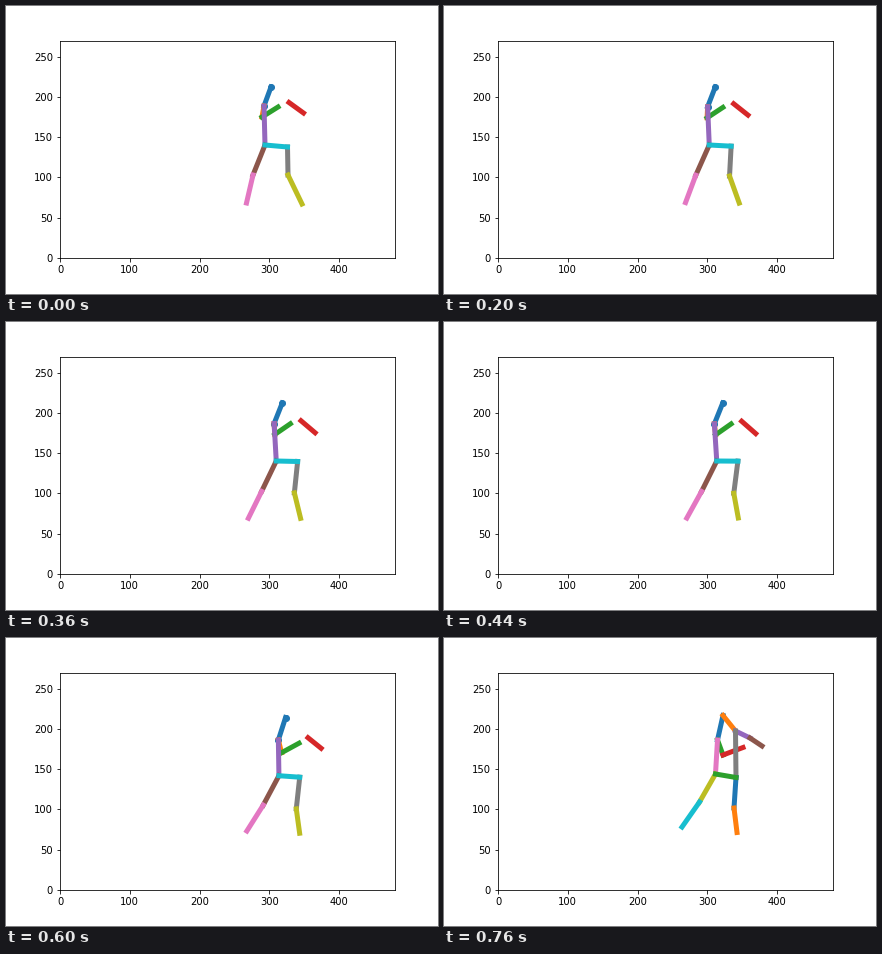
A matplotlib script for the animation above (800 ms loop, 432 by 288 pixels).

```python
import numpy as np
import matplotlib.pyplot as plt
from matplotlib.animation import FuncAnimation

FRAMES, INTERVAL = 20, 40
W, H = 432, 288
X_MAX, Y_MAX = 480, 270
LEFT, RIGHT, BOTTOM, TOP = 0.125, 0.9, 0.125, 0.88
REACH = 12  # frame at which the body stops moving forward

# Key points in stage pixels: start, (furthest reach,) end.
PATHS = {
    "nose": [(265, 81), (280, 81), (279, 77.5)],
    "l_shoulder": [(258, 100), (271.5, 102), (273.5, 102)],
    "l_elbow": [(256, 111), (273, 113), (279, 117)],
    "l_wrist": [(272, 101), (288.5, 102), (299, 109.5)],
    "r_shoulder": [(291.5, 93)],
    "r_elbow": [(283, 96.5), (299, 99.5), (306, 100)],
    "r_wrist": [(297.5, 107), (313, 112), (318, 108)],
    "l_hip": [(259, 139), (274, 139), (271.5, 136)],
    "r_hip": [(281.5, 141), (295, 139), (292, 139.5)],
    "l_knee": [(247, 169), (258.5, 169.5), (255.5, 164)],
    "l_ankle": [(240.5, 197), (243, 196), (238, 189)],
    "r_knee": [(282, 169), (290.5, 171.5), (290, 170)],
    "r_ankle": [(296, 198), (293, 194.5)],
}

BONES = [
    ("nose", "l_shoulder"), ("nose", "r_shoulder"),
    ("l_shoulder", "l_elbow"), ("l_elbow", "l_wrist"),
    ("r_shoulder", "r_elbow"), ("r_elbow", "r_wrist"),
    ("l_shoulder", "l_hip"), ("r_shoulder", "r_hip"),
    ("l_hip", "l_knee"), ("l_knee", "l_ankle"),
    ("r_hip", "r_knee"), ("r_knee", "r_ankle"),
    ("l_hip", "r_hip"),
]


def joint(name, i):
    """Joint position in data units."""
    points = PATHS[name]
    times = [0, REACH, FRAMES - 1] if len(points) == 3 else [0, FRAMES - 1][:len(points)]
    px, py = (np.interp(i, times, values) for values in zip(*points))
    x = (px / W - LEFT) / (RIGHT - LEFT) * X_MAX
    y = (1 - py / H - BOTTOM) / (TOP - BOTTOM) * Y_MAX
    return x, y


fig, ax = plt.subplots(figsize=(W / 72, H / 72), dpi=72, facecolor="white")
fig.subplots_adjust(left=LEFT, right=RIGHT, bottom=BOTTOM, top=TOP)
ax.set(xlim=(0, X_MAX), ylim=(0, Y_MAX),
       xticks=range(0, 401, 100), yticks=range(0, 251, 50))
lines = [ax.plot([], [], lw=5)[0] for _ in BONES]


def draw(i):
    # The right shoulder is only detected at the very end of the loop.
    full = i == FRAMES - 1
    color = 0
    for line, bone in zip(lines, BONES):
        shown = full or "r_shoulder" not in bone
        line.set_visible(shown)
        if shown:
            line.set_data(*zip(*(joint(name, i) for name in bone)))
            line.set_color(f"C{color % 10}")
            color += 1
    lines[0].set_marker("None" if full else "o")
    return lines


anim = FuncAnimation(fig, draw, frames=FRAMES, interval=INTERVAL,
                     repeat=True, repeat_delay=0)
plt.show()
```
